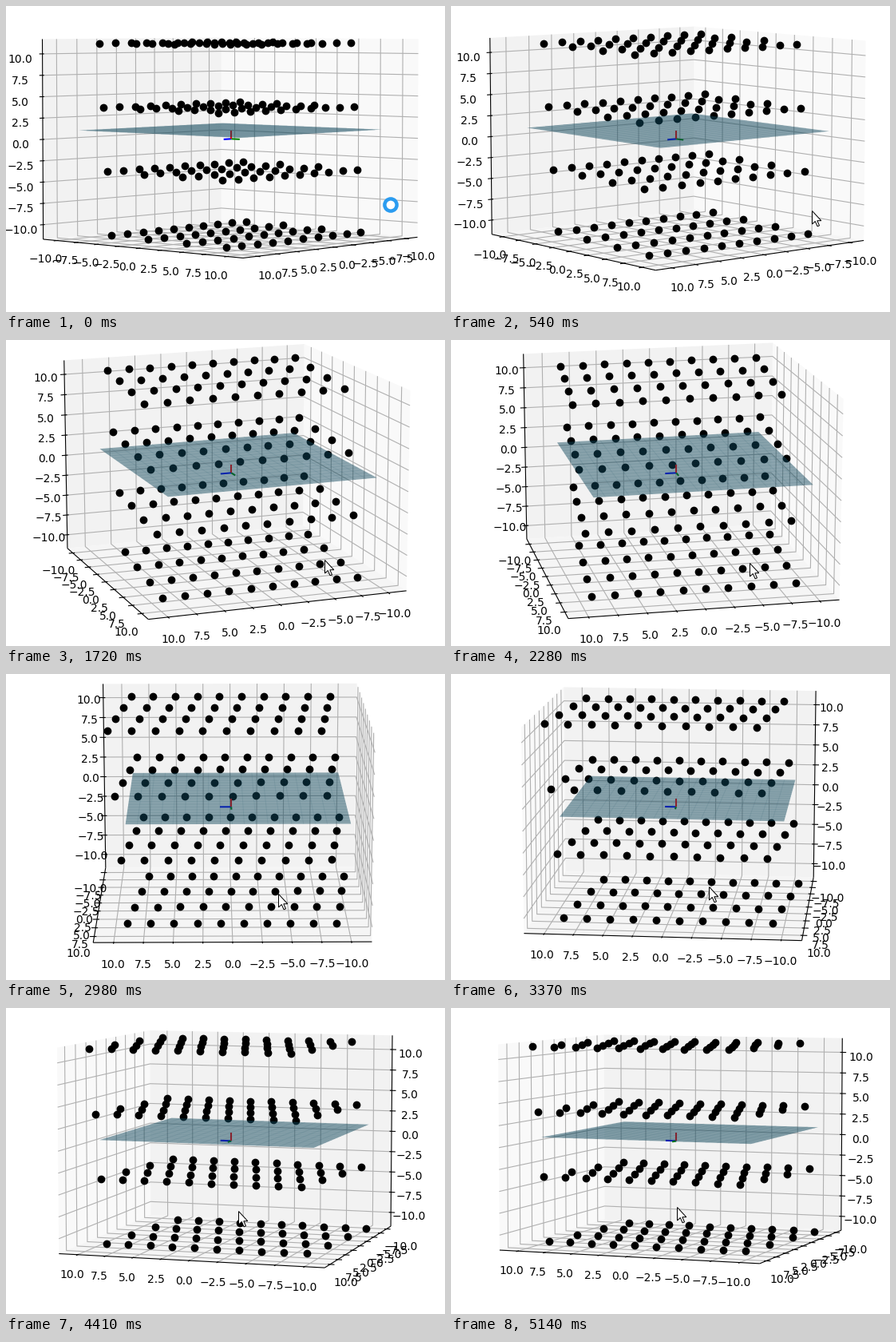
Write a matplotlib script that moves like this. It is 550 px wide and 383 px high and loops after 5.22 s.

```python
import numpy as np
import matplotlib.pyplot as plt
from matplotlib.animation import FuncAnimation
from matplotlib.collections import LineCollection
from matplotlib.patches import Circle, Polygon

W, H, DPI = 550, 383, 100
LOOP, STEP = 5220, 30
REDRAW = 78.3  # the picture refreshes once per this many ms

# Axes box and perspective
CENTER = np.array([282.2, 166.3])
ZOOM, DIST = 2796, 10
HALF = 11.25
L = HALF * 25 / 24
SCALE = np.array([8, 8, 6]) / 7 / (2 * HALF)
LABEL_PAD, TICK_OUT, TICK_IN = 1.38, 0.375, 0.19
TICKS = np.arange(-10, 10.1, 2.5)

# Camera keys: time, azimuth, elevation
KEYS = np.array([(0, 41.7, 3), (1090, 59.7, 10.2), (2280, 78, 15.1),
                 (2980, 89.5, 14), (3810, 102.2, 8), (4410, 107.6, 6.5),
                 (5140, 110.9, 4.7)])
KT, KV = KEYS[:, 0], KEYS[:, 1:]
SLOPE = np.gradient(KV, KT, axis=0)

# Dragging the mouse turns the view; the view trails the pointer
DEG_PER_PX, LAG = 180 / 518, 80
GRIP = np.array([482, 244])


def camera(t):
    """Azimuth and elevation by cubic Hermite interpolation."""
    t = min(t, KT[-1])
    i = min(np.searchsorted(KT, t, "right") - 1, len(KT) - 2)
    h = KT[i + 1] - KT[i]
    s = (t - KT[i]) / h
    return ((1 + 2 * s) * (1 - s) ** 2 * KV[i] + s * (1 - s) ** 2 * h * SLOPE[i]
            + s * s * (3 - 2 * s) * KV[i + 1] + s * s * (s - 1) * h * SLOPE[i + 1])


def pointer(t):
    turn = (camera(t + LAG) - KV[0]) / DEG_PER_PX
    return np.round(GRIP + turn * (-1, 1)) + 0.5


def project(points, az, el):
    x, y, z = np.moveaxis(np.asarray(points) * SCALE, -1, 0)
    ca, sa, ce, se = np.cos(az), np.sin(az), np.cos(el), np.sin(el)
    near = x * ca + y * sa
    size = ZOOM / (DIST - near * ce - z * se)
    return CENTER + np.stack([(y * ca - x * sa) * size,
                              (near * se - z * ce) * size], -1)


def others(axis):
    return [i for i in range(3) if i != axis]


def edge_point(axis, t, far, out=0, drop=0):
    """Point on the labelled edge of an axis, pushed away from the box."""
    b, c = others(axis)
    p = far.copy()
    p[b] *= -1 - out / L
    p[c] *= 1 + drop / L
    p[axis] = t
    return p


def grid_line(axis, t, far):
    """Line across both back walls, bent where they meet."""
    b, c = others(axis)
    p = np.tile(far, (3, 1))
    p[0, b] *= -1
    p[2, c] *= -1
    p[:, axis] = t
    return p


SQUARE = np.array([(-1, -1), (1, -1), (1, 1), (-1, 1)])


def lattice():
    a, b = np.arange(-4.5, 5), np.arange(-1.5, 2)
    i, j, k = (g.ravel() for g in np.meshgrid(a, b, b))
    return np.column_stack([2 * i + 0.49 * (j + k), 4.95 * j, 7.5 * k])


def square(axis, at, half, mid=0):
    return np.insert(SQUARE * half + mid, axis, at, axis=1)


DOTS = lattice()
LO, HI = -10, 9
SHEET = square(2, 1, (HI - LO) / 2, (HI + LO) / 2)
ROWS = np.array([[(v, LO, 1), (v, HI, 1)] for v in range(LO + 1, HI)])
MESH = np.concatenate([ROWS, ROWS[..., [1, 0, 2]]])
TRIAD = [(np.zeros(3), e) for e in np.eye(3)]
ARROW = np.array([(0, 0), (0, 16.5), (3.8, 13), (6.6, 19.3), (9, 18.3),
                  (6.3, 12.2), (11.3, 12.2)])
MARKS = [(axis, t) for axis in range(3) for t in TICKS]

fig = plt.figure(figsize=(W / DPI, H / DPI), dpi=DPI, facecolor="white")
ax = fig.add_axes([0, 0, 1, 1])
ax.set_xlim(0, W)
ax.set_ylim(H, 0)
ax.axis("off")


def add_poly(**kw):
    return ax.add_patch(Polygon(np.zeros((3, 2)), closed=True, **kw))


def add_lines(color, width, **kw):
    lines = LineCollection([], colors=color, linewidths=width, **kw)
    ax.add_collection(lines, autolim=False)
    return lines


TEAL = "#11485c"
walls = [add_poly(fc=str(g), ec="none", zorder=1) for g in (0.975, 0.95, 0.9625)]
grid = add_lines("#b0b0b0", 0.8, zorder=2)
spines = add_lines("black", 0.8, zorder=3)
ticks = add_lines("black", 0.8, zorder=3)
labels = [ax.text(0, 0, f"{t:.1f}".replace("-", "\u2212"), fontsize=10,
                  family="DejaVu Sans", ha="center", va="top", zorder=3)
          for _, t in MARKS]
dots, = ax.plot([], [], "ko", ms=6, zorder=4)
triad = add_lines(["blue", "green", "red"], 1.5, zorder=5)
sheet = add_poly(fc=TEAL, ec="none", alpha=0.47, zorder=6)
mesh = add_lines(TEAL, 0.7, alpha=0.1, zorder=6)
ring = ax.add_patch(Circle((482, 249), 7.6, fc="white", ec="#2b9cf0",
                           lw=3.2, zorder=8))
arrow = add_poly(fc="white", ec="black", lw=0.72, zorder=8)


def update(n):
    t = (n * STEP + 20) // REDRAW * REDRAW
    az, el = np.radians(camera(t))
    far = np.array([-L if np.cos(az) >= 0 else L, -L, -L])

    def view(points):
        return project(points, az, el)

    for axis, wall in enumerate(walls):
        wall.set_xy(view(square(axis, far[axis], L)))
    grid.set_segments(view([grid_line(a, v, far) for a, v in MARKS]))
    spines.set_segments(view([[edge_point(a, v, far) for v in (-L, L)]
                              for a in range(3)]))
    ticks.set_segments(view([[edge_point(a, v, far, out)
                              for out in (TICK_OUT, -TICK_IN)]
                             for a, v in MARKS]))
    spots = view([edge_point(a, v, far, LABEL_PAD, LABEL_PAD) for a, v in MARKS])
    for label, spot in zip(labels, spots):
        label.set_position(spot)

    dots.set_data(*view(DOTS).T)
    triad.set_segments(view(TRIAD))
    sheet.set_xy(view(SHEET))
    mesh.set_segments(view(MESH))

    ring.set_visible(t == 0)
    arrow.set_visible(t > 0)
    arrow.set_xy(ARROW + pointer(t))
    return []


anim = FuncAnimation(fig, update, frames=LOOP // STEP, interval=STEP,
                     init_func=lambda: update(0), repeat=True, repeat_delay=0,
                     blit=False)
plt.show()
```
